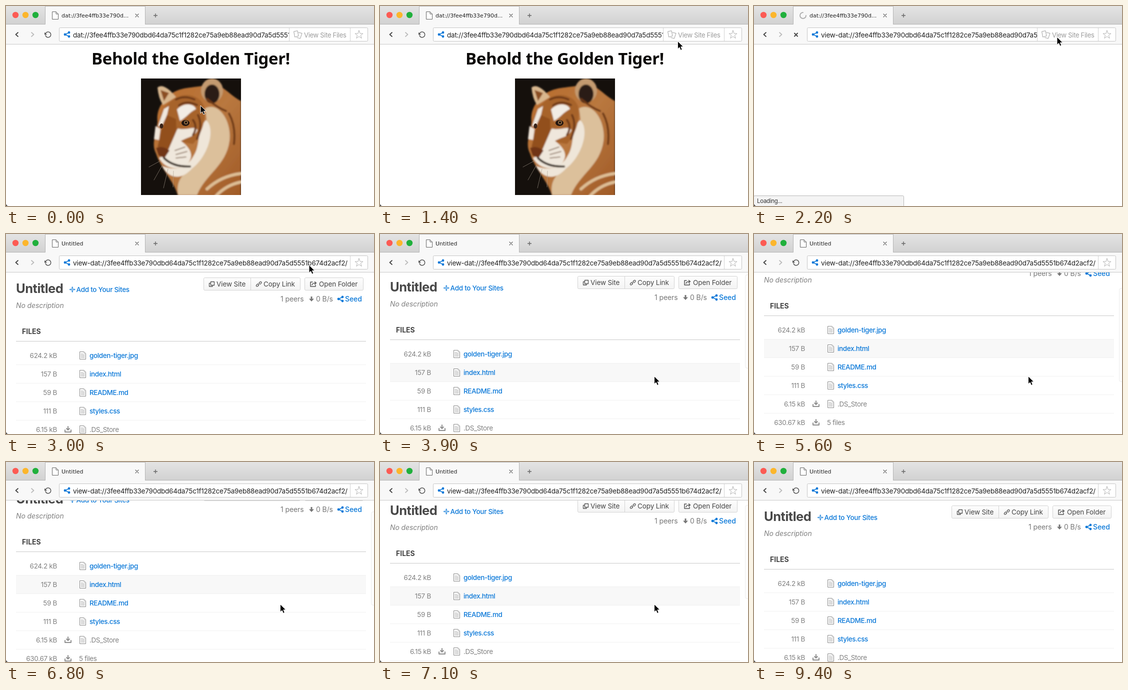
An HTML page for the animation above (9900 ms loop, 736 by 400 pixels).

```html
<!DOCTYPE html>
<html lang="en">
<head>
<meta charset="utf-8">
<title>Site files</title>
<style>
html, body { margin: 0; width: 100%; height: 100%; overflow: hidden; background: #fff; }
svg { display: block; width: 736px; height: 400px; }
text { font: 13.5px Inter, Roboto, sans-serif; white-space: pre; }
.tab { font: 11px "DejaVu Sans", sans-serif; fill: #222; }
.url { letter-spacing: -.23px; fill: #222; }
.site { font-size: 13px; letter-spacing: -.3px; fill: #9b9b9b; }
.head { font: 700 33px "Noto Sans", "Open Sans", sans-serif; letter-spacing: -.4px; fill: #0c0a08; }
.title { font-size: 25.5px; font-weight: 700; letter-spacing: -.5px; fill: #484848; }
.add { font-weight: 500; letter-spacing: -.28px; fill: #0a78d8; }
.note { font-size: 14px; font-style: italic; letter-spacing: -.1px; fill: #808080; }
.btn { letter-spacing: -.1px; fill: #444; }
.stat { font-size: 14px; letter-spacing: -.1px; fill: #777; }
.seed { font-weight: 500; fill: #0a78d8; }
.label { font-size: 14px; font-weight: 700; fill: #444; }
.size { text-anchor: end; letter-spacing: -.3px; fill: #808080; }
.file { letter-spacing: -.4px; fill: #808080; }
.link { font-weight: 500; fill: #0a78d8; }
.load { font-size: 11.5px; letter-spacing: -.3px; fill: #333; }
.line { fill: none; stroke-linecap: round; stroke-linejoin: round; }
</style>
</head>
<body>
<svg viewBox="0 0 736 400">
  <defs>
    <linearGradient id="bar" x2="0" y2="1"><stop stop-color="#e4e4e4"/><stop offset="1" stop-color="#d1d1d1"/></linearGradient>
    <linearGradient id="btn" x2="0" y2="1"><stop stop-color="#fdfdfd"/><stop offset="1" stop-color="#f4f4f4"/></linearGradient>
    <linearGradient id="fur" x2="1" y2="1"><stop stop-color="#b96c2c"/><stop offset=".5" stop-color="#b9783f"/><stop offset="1" stop-color="#a05a26"/></linearGradient>
    <filter id="soft"><feGaussianBlur stdDeviation="1.6"/></filter>
    <clipPath id="photo"><rect x="270" y="145" width="200" height="233"/></clipPath>
    <clipPath id="view"><rect y="77" width="736" height="323"/></clipPath>
    <clipPath id="field"><rect id="fieldBox" x="134" y="44" width="432" height="27"/></clipPath>
    <g id="share" fill="#0a78d8" stroke="#0a78d8">
      <path class="line" stroke-width="1.6" d="M4.5 -4L-4 0L4.5 4"/>
      <g stroke="none"><circle cx="4" cy="-4" r="2.4"/><circle cx="-4" r="2.4"/><circle cx="4" cy="4" r="2.4"/></g>
    </g>
    <g id="sheet">
      <path d="M.5 .5H9L12.5 4V15.5H.5Z" fill="#fcfcfc" stroke="#8c8c8c"/>
      <path d="M9 .5V4H12.5M2.5 4.5H7M2.5 6.5H10.5M2.5 8.5H10.5M2.5 10.5H10.5M2.5 12.5H10.5" fill="none" stroke="#bdbdbd"/>
    </g>
    <path id="save" class="line" stroke="#909090" stroke-width="2" d="M7 0V6M4 4L7 7L10 4M1 7V11H13V7"/>
  </defs>
  <rect width="736" height="400" fill="#fff"/>

  <g id="tiger">
    <text class="head" x="171" y="117">Behold the Golden Tiger!</text>
    <g clip-path="url(#photo)">
      <rect x="270" y="145" width="200" height="233" fill="#15100c"/>
      <g filter="url(#soft)">
        <path fill="url(#fur)" d="M330 176C350 160 385 164 398 158C425 145 445 178 470 190V380H344C336 350 312 330 300 295C290 275 300 260 303 232C300 205 315 188 330 176Z"/>
        <path fill="#d9b78e" d="M303 163Q312 155 329 170L340 182L314 198Q305 185 303 163Z"/>
        <path fill="#8a4e22" d="M309 168L326 174L316 190Z"/>
        <ellipse cx="412" cy="169" rx="22" ry="24" fill="#c39a70"/>
        <ellipse cx="412" cy="176" rx="15" ry="19" fill="#2c1c13"/>
        <path fill="#dcc09b" d="M398 205C425 190 452 230 447 270C440 320 400 335 382 378H344C340 350 352 338 368 326C398 300 408 260 398 205Z"/>
        <path fill="#efe6d9" d="M400 228C420 245 405 300 372 325C350 350 325 345 312 320C335 330 362 325 375 300C390 278 380 250 400 228Z"/>
        <path fill="#a7642c" d="M330 190C355 168 388 178 396 200C402 230 388 262 374 276L340 270L322 285L303 260C304 230 310 207 330 190Z"/>
        <path fill="#f2ece4" d="M342 207C356 192 376 195 380 206C366 213 362 222 348 230Z"/>
        <path fill="#f0e8de" d="M316 206L326 200L322 218L312 240L304 240Z"/>
        <path fill="#efe7dc" d="M344 245C360 250 378 238 383 248C378 262 362 262 350 270C372 286 376 302 362 317C340 330 318 325 306 304L322 296C326 280 332 262 344 245Z"/>
        <path fill="#f0e6da" d="M299 240L309 246L306 268L296 266Z"/>
        <path fill="#92501f" d="M322 218L340 226L341 250L325 287L303 282L310 252Z"/>
        <path fill="#713519" d="M300 284Q313 278 327 289L317 304L305 299Z"/>
        <path class="line" stroke="#2a1a10" stroke-width="4" d="M316 304Q334 322 368 321"/>
        <path class="line" stroke="#6d3816" stroke-width="4" d="M340 187Q357 178 377 187M346 199Q360 188 382 198M384 218Q394 238 382 266M374 228Q384 242 374 258M402 186Q424 204 440 210M446 215Q460 240 456 276"/>
        <path class="line" stroke="#ddbd94" stroke-width="6" d="M402 366Q430 340 470 335M420 380Q440 358 470 352"/>
        <path class="line" stroke="#6d4a30" stroke-width="1.5" d="M338 289L358 282M340 297L362 291M340 304L360 302"/>
      </g>
      <ellipse cx="359" cy="234" rx="8" ry="6" fill="#221510"/>
      <circle cx="360" cy="233" r="4" fill="#8b6640"/><circle cx="360" cy="233" r="2" fill="#0c0805"/>
      <ellipse cx="311" cy="240" rx="3.5" ry="5" fill="#39241a"/>
      <path class="line" stroke="#a69a8d" stroke-width=".6" d="M310 309L286 322M314 316L296 348M324 326L315 364M335 330L334 362"/>
    </g>
  </g>

  <g id="page" clip-path="url(#view)"><g id="scroll"></g><rect id="thumb" x="730.5" width="12" height="187" rx="4" fill="#fdfdfd" stroke="#ededed"/></g>

  <g id="loading">
    <rect x="-.5" y="379.5" width="300" height="22" rx="2" fill="#f4f4f4" stroke="#b9b9b9"/>
    <text class="load" x="6" y="394">Loading...</text>
  </g>

  <rect width="736" height="37" fill="url(#bar)"/>
  <rect y="37" width="736" height="39" fill="#f8f8f8"/>
  <path d="M0 36.5H78.5V.5H278.5V36.5H736" fill="none" stroke="#b4b4b4"/>
  <rect x="79" y="1" width="199" height="37" fill="#f8f8f8"/>
  <path d="M0 76.5H736" stroke="#cacaca"/>
  <circle cx="19" cy="18" r="6.2" fill="#fc5b54"/><circle cx="39" cy="18" r="6.2" fill="#fcb62c"/><circle cx="59" cy="18" r="6.2" fill="#20b03c"/>
  <path id="doc" d="M92.5 11.5H100L104.500 16V26.500H92.500ZM100 11.500V16H104.500" fill="#fff" stroke="#666"/>
  <path id="spin" class="line" stroke="#b0b0b0" stroke-width="2" d="M98 13A6 6 0 1 0 104 19"/>
  <text class="tab" id="tabName" x="111" y="23"></text>
  <path class="line" stroke="#666" stroke-width="1.2" d="M259 16L265 22M265 16L259 22"/>
  <path stroke="#666" stroke-width="1.4" d="M295 19H303M299 15V23"/>
  <path class="line" stroke="#444" stroke-width="1.8" d="M24 53L19.500 57L24 61"/>
  <path class="line" stroke="#bcbcbc" stroke-width="1.8" d="M51 53L55.500 57L51 61"/>
  <g id="reload"><path class="line" stroke="#555" stroke-width="1.5" d="M79.500 54.500A5.500 5.500 0 1 1 79 59"/><path fill="#555" d="M77 52.500V57.500H82Z"/></g>
  <path id="stop" class="line" stroke="#444" stroke-width="2" d="M81 54.500L87 60.500M87 54.500L81 60.500"/>
  <rect x="106.500" y="43.500" width="617" height="27" rx="2" fill="#fff" stroke="#c6c6c6"/>
  <use href="#share" x="122" y="57"/>
  <g clip-path="url(#field)"><text class="url" id="url" x="134" y="63"></text></g>
  <path d="M688.500 44V70" stroke="#d2d2d2"/>
  <path class="line" stroke="#b4b4b4" d="M706 49L708.200 55H714L709.400 58.700L711.200 64.500L706 61L700.800 64.500L702.600 58.700L698 55H703.800Z"/>
  <g id="siteFiles">
    <path d="M566.500 44V70" stroke="#d2d2d2"/>
    <path class="line" stroke="#a0a0a0" d="M576 51L583 49.500L585 60L578 62ZM585 53L592 54.500L588.500 65L581.500 63"/>
    <text class="site" x="596" y="63">View Site Files</text>
  </g>
  <path d="M0 396V400H4Q1 399 0 396Z" fill="#333"/>
  <path id="cursor" d="M0 0V15.500L3.600 12.300L6 18L8.800 16.800L6.400 11.200H11.300Z" fill="#000" stroke="#fff" stroke-width="1"/>
</svg>
<script>
const LOOP = 9900, STEP = 100, NAV = 2100, READY = 2600;
const HASH = "3fee4ffb33e790dbd64da75c1f1282ce75a9eb88ead90d7a5d5551b674d2acf2";
const ROW = 37, TOP = 224;
const $ = id => document.getElementById(id);

// time, x, y
const cursorTrack = [
  [0, 389, 199], [300, 389, 199], [1000, 553, 104], [1500, 606, 62], [3000, 606, 62],
  [3600, 548.5, 284.5], [7200, 548.5, 284.5], [7600, 640, 170], [8600, 700, 90], [8900, 742, -22]
];
// time, offset
const scrollTrack = [
  [3800, 0], [3900, 3], [4000, 8], [4300, 29], [4600, 42], [4700, 42], [5000, 51],
  [6600, 51], [7100, 12], [7300, 0]
];

function at(track, t) {
  const next = track.findIndex(k => k[0] > t);
  if (next < 0) return track[track.length - 1].slice(1);
  if (next === 0) return track[0].slice(1);
  const a = track[next - 1], b = track[next], p = (t - a[0]) / (b[0] - a[0]);
  return a.slice(1).map((v, i) => v + (b[i + 1] - v) * p);
}

const text = (cls, x, y, s) => `<text class="${cls}" x="${x}" y="${y}">${s}</text>`;
const box = (x, w) => `<rect x="${x}" y="87.5" width="${w}" height="25" rx="2" fill="url(#btn)" stroke="#d3d3d3"/>`;
const icon = (d, color = "#555", w = 1.3) => `<path class="line" stroke="${color}" stroke-width="${w}" d="${d}"/>`;

function fileRow([size, name, kind], i) {
  const mid = TOP + 19 + ROW * i, plain = kind !== "link";
  return text("size", 102, mid + 5, size)
    + (plain ? `<use href="#save" x="117" y="${mid - 6}"/>` : "")
    + (kind === "total" ? text("file", 146, mid + 5, name)
      : `<use href="#sheet" x="147" y="${mid - 8}"/>` + text(plain ? "file" : "file link", 167, mid + 5, name)
        + `<path d="M20 ${mid + 18.5}H720" stroke="#f1f1f1"/>`);
}

const files = [
  ["624.2 kB", "golden-tiger.jpg", "link"], ["157 B", "index.html", "link"],
  ["59 B", "README.md", "link"], ["111 B", "styles.css", "link"],
  ["6.15 kB", ".DS_Store", "plain"], ["630.67 kB", "5 files", "total"]
];

$("scroll").innerHTML =
  `<rect id="hover" x="20" width="700" height="${ROW}" fill="#f8f8f8"/>`
  + text("title", 20, 117.5, "Untitled")
  + icon("M128.500 111H137M132.750 106.700V115.300", "#0a78d8", 2.6) + icon("M129 111H136.500M132.750 107.200V114.800", "#fff", .8)
  + text("add", 140.5, 116, "Add to Your Sites")
  + text("note", 20, 148, "No description")
  + box(395.5, 193) + `<path d="M489.500 88V112" stroke="#d3d3d3"/>` + box(597.5, 117)
  + icon("M409.500 95.500H416.500V102.500H409.500ZM409 98.500H406.500V105H413V103")
  + text("btn", 421, 105, "View Site")
  + icon("M504.500 101.500L507 99M503.500 99.500L501 102Q499.500 104 501.500 105Q503 105.500 505.500 102.500M506 98L508 95.800Q510 94.500 511 96.500Q511.300 98 508.500 100.500")
  + text("btn", 515, 105, "Copy Link")
  + icon("M613 96H609V105H619V102M612 102Q612.500 98 620 98M617.500 95.500L620.500 98L617.500 100.500", "#555", 1.5)
  + text("btn", 626, 105, "Open Folder")
  + text("stat", 549, 135, "1 peers")
  + `<path d="M609.500 125H612.500V129.500H616L611 135L606 129.500H609.500Z" fill="#777"/>`
  + text("stat", 620, 135, "0 B/s")
  + `<use href="#share" x="669" y="130"/>` + text("stat seed", 678, 135, "Seed")
  + text("label", 32, 200, "FILES")
  + `<path d="M20 214.500H720" stroke="#c9c9c9"/>`
  + files.map(fileRow).join("");

const show = (id, on) => $(id).style.display = on ? "" : "none";

function draw(time) {
  const t = Math.floor(time / STEP) * STEP;
  const loading = t >= NAV && t < READY, ready = t >= READY;
  const [x, y] = at(cursorTrack, t), [offset] = at(scrollTrack, t);
  const row = Math.floor((y - TOP) / ROW);

  show("tiger", t < NAV);
  show("page", ready);
  for (const id of ["loading", "spin", "stop"]) show(id, loading);
  for (const id of ["doc", "reload"]) show(id, !loading);
  show("siteFiles", !ready);
  show("hover", row >= 0 && row < files.length);
  show("thumb", t >= 3800 && t < 7600);
  show("cursor", t < 8900);

  $("tabName").textContent = ready ? "Untitled" : `dat://${HASH.slice(0, 15)}...`;
  $("url").textContent = `${t < NAV ? "" : "view-"}dat://${HASH}/`;
  $("fieldBox").setAttribute("width", ready ? 554 : 432);
  $("spin").setAttribute("transform", `rotate(${(t - 2200) * .36} 98 19)`);
  $("scroll").setAttribute("transform", `translate(0 ${-Math.round(offset)})`);
  $("hover").setAttribute("y", TOP + ROW * row);
  $("thumb").setAttribute("y", Math.round(79 + offset * .56) + .5);
  $("cursor").setAttribute("transform", `translate(${x} ${y})`);
}

const start = performance.now();
function tick() {
  draw((performance.now() - start) % LOOP);
  requestAnimationFrame(tick);
}
tick();
</script>
</body>
</html>
```
